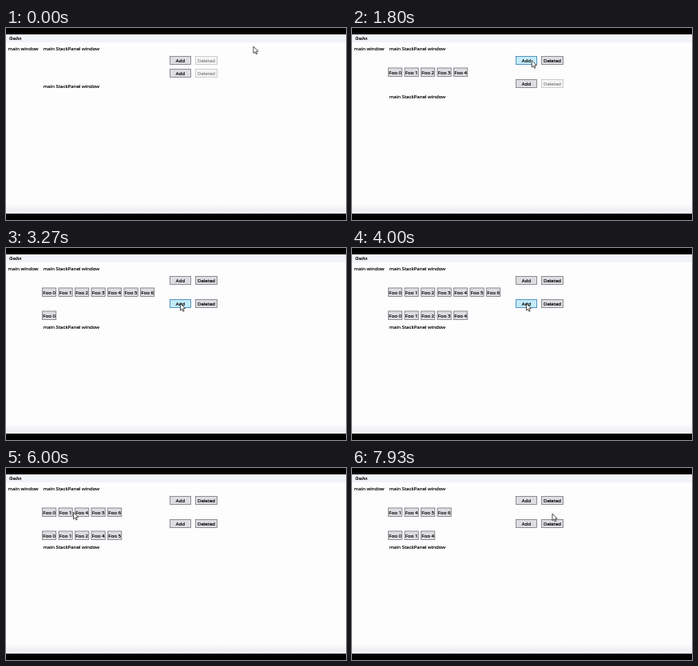
An HTML page with a canvas that plays this animation: 426 by 240 pixels, repeating every 8 s.

```html
<!DOCTYPE html>
<html lang="en">
<head>
<meta charset="utf-8">
<title>Stack panels</title>
<style>
  html, body { margin: 0; width: 100%; height: 100%; overflow: hidden; background: #000; }
  canvas { display: block; width: 100vw; height: 100vh; }
</style>
</head>
<body>
<canvas width="426" height="240"></canvas>
<script>
const ctx = document.querySelector('canvas').getContext('2d');
const LOOP = 8000, FPS = 15;

// The pointer rests on a button from start to end and clicks it at even intervals.
const visit = (row, label, start, end, clicks = 1, across = 0.5) =>
  ({ row, label, start, end, clicks, across });
const tour = [
  visit(0, 'Add', 1130, 2150, 7, 0.75),
  visit(0, 'Deleted', 2530, 2550, 0),
  visit(1, 'Add', 3000, 4250, 6),
  visit(1, 'Foo 3', 4800, 4950),
  visit(0, 'Foo 3', 5310, 5500, 1, 0.15),
  visit(0, 'Foo 2', 5750, 5900),
  visit(0, 'Foo 0', 6200, 6350),
  visit(1, 'Foo 2', 6800, 7000, 1, 0.95),
  visit(1, 'Deleted', 7450, 7650),
  visit(0, 'Deleted', 8130, 8200, 0)
];

function rowsAt(t) {
  const rows = [[], []];
  for (const { row, label, start, end, clicks } of tour) {
    for (let i = 0; i < clicks; i++) {
      if (start + (end - start) * (i + 1) / (clicks + 1) > t) break;
      if (label === 'Add') rows[row].push('Foo ' + i);
      else if (label === 'Deleted') rows[row].pop();
      else rows[row] = rows[row].filter(item => item !== label);
    }
  }
  return rows;
}

function layout(rows) {
  const buttons = [];
  let top = 35;
  rows.forEach((items, row) => {
    const y = Math.round(top);
    const add = (label, x, dy, w, h, enabled = true) =>
      buttons.push({ row, label, x, y: y + dy, w, h, enabled });
    add('Add', 205, 0, 27, 11);
    add('Deleted', 237, 0, 28, 11, items.length > 0);
    items.forEach((item, i) => add(item, 45 + i * 20.5, 14.5, 18.2, 11.5));
    top += items.length ? 29.4 : 16;
  });
  return { buttons, bottom: top };
}

const stops = [{ x: 310, y: 23, start: 0, end: 130 }];
for (const { row, label, start, end, across } of tour) {
  const b = layout(rowsAt(start)).buttons.find(b => b.row === row && b.label === label);
  stops.push({ x: b.x + b.w * across, y: b.y + b.h / 2, start, end });
}

function pointerAt(t) {
  const next = stops.findIndex(s => s.end > t);
  const to = stops[next], from = stops[Math.max(0, next - 1)];
  if (t >= to.start) return to;
  const u = (t - from.end) / (to.start - from.end), k = u * u * (3 - 2 * u);
  return { x: from.x + (to.x - from.x) * k, y: from.y + (to.y - from.y) * k };
}

function rect(x, y, w, h, color) {
  ctx.fillStyle = color;
  ctx.fillRect(x, y, w, h);
}

// A hairline stroke gives small type its full weight.
function text(value, x, baseline, color = '#000', align = 'left') {
  ctx.fillStyle = ctx.strokeStyle = color;
  ctx.textAlign = align;
  ctx.lineWidth = 0.2;
  ctx.fillText(value, x, baseline);
  ctx.strokeText(value, x, baseline);
}

function drawButton({ label, x, y, w, h, enabled }, pointer) {
  const hover = enabled && pointer.x >= x && pointer.x <= x + w &&
    pointer.y >= y && pointer.y <= y + h;
  rect(x, y, w, h, hover ? '#c2eaf9' : enabled ? '#dddde2' : '#f5f5f5');
  ctx.strokeStyle = hover ? '#3c7fb1' : enabled ? '#7c7c80' : '#c2c2c2';
  ctx.lineWidth = 0.8;
  ctx.strokeRect(x + 0.5, y + 0.5, w - 1, h - 1);
  text(label, x + w / 2, y + h / 2 + 2.3, enabled ? '#000' : '#8a8a8a', 'center');
}

function drawPointer({ x, y }) {
  ctx.fillStyle = '#fff';
  ctx.strokeStyle = '#222';
  ctx.lineWidth = 0.8;
  ctx.save();
  ctx.translate(x, y);
  const arrow = new Path2D('M0 0V8.6L2 6.8 3.4 9.8 4.7 9.2 3.4 6.3 6 6.1Z');
  ctx.fill(arrow);
  ctx.stroke(arrow);
  ctx.restore();
}

function drawWindow() {
  rect(0, 0, 426, 240, '#000');
  rect(0, 8, 426, 224, '#fdfdfe');
  rect(0, 8, 426, 10, '#f0f3f7');
  const fade = ctx.createLinearGradient(0, 220, 0, 227);
  fade.addColorStop(0, '#fdfdfe');
  fade.addColorStop(1, '#f0f1f4');
  rect(0, 220, 426, 12, fade);
  text('Файл', 4, 15.4);
  text('main window', 2.6, 27.8);
  text('main StackPanel window', 46.7, 27.8);
}

function draw(t) {
  const pointer = pointerAt(t);
  const { buttons, bottom } = layout(rowsAt(t));
  ctx.font = '6.1px "Open Sans", "Noto Sans", sans-serif';
  drawWindow();
  buttons.forEach(b => drawButton(b, pointer));
  text('main StackPanel window', 46.7, bottom + 7.6);
  drawPointer(pointer);
}

function frame(now) {
  const t = now % LOOP;
  draw(Math.floor(t * FPS / 1000) * 1000 / FPS);
  requestAnimationFrame(frame);
}
requestAnimationFrame(frame);
</script>
</body>
</html>
```
